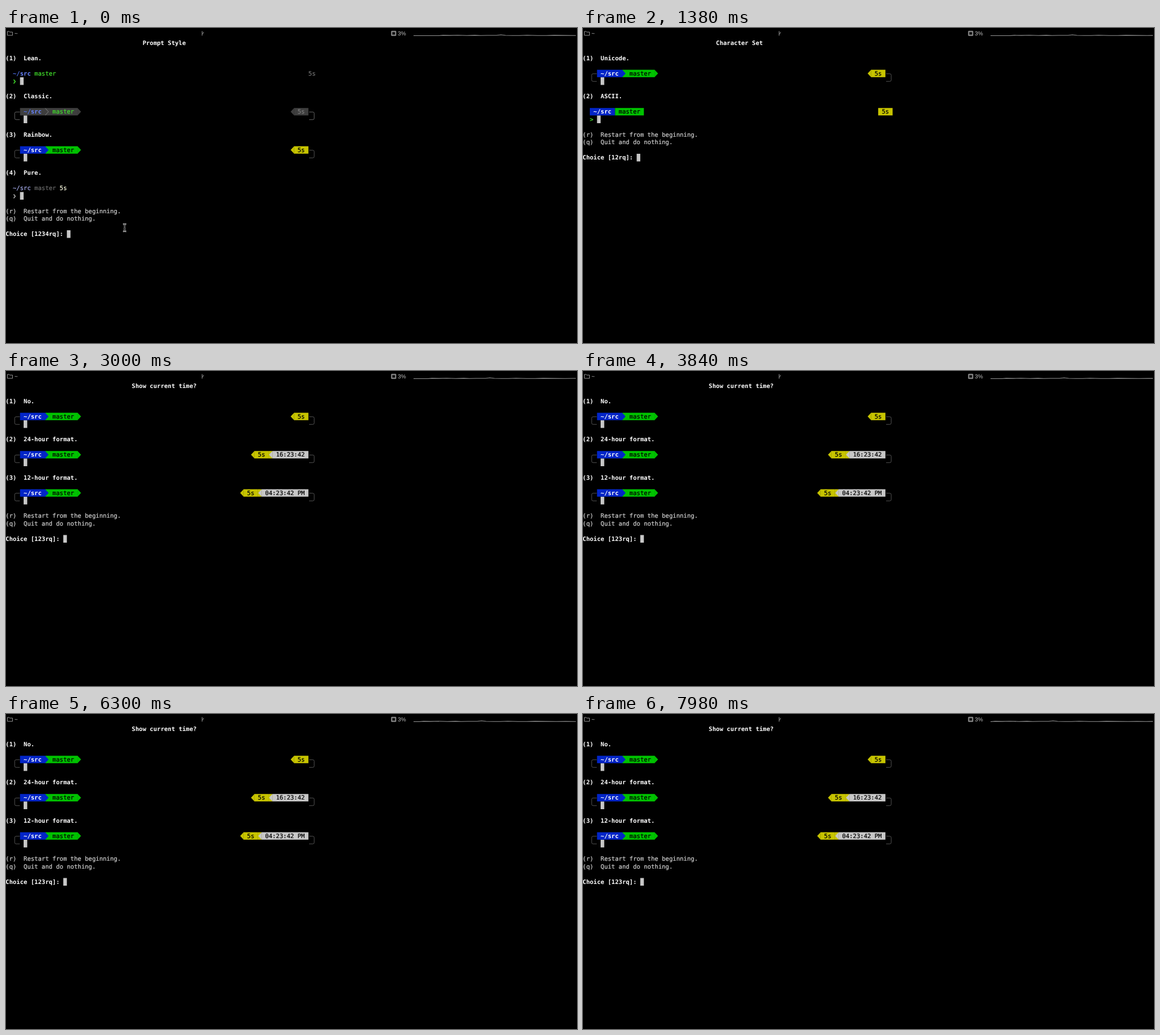
An HTML page for the animation above (8 s loop, 1006 px wide and 556 px high).

```html
<!DOCTYPE html>
<html lang="en">
<head>
<meta charset="utf-8">
<title>Prompt setup wizard</title>
<style>
  html, body { margin: 0; width: 100%; height: 100%; overflow: hidden; background: #000; }
  svg { display: block; }
  text {
    font-family: "DejaVu Sans Mono", monospace;
    font-size: 10.55px;
    text-rendering: geometricPrecision;
    white-space: pre;
  }
  .bold { font-weight: bold; }
  .plain { stroke-width: .22; }
  .status { font-family: "Liberation Sans", sans-serif; font-size: 10px; fill: #bcbcbc; }
  .line { fill: none; stroke: #959595; }
</style>
</head>
<body>
<svg id="stage" width="1006" height="556" viewBox="0 0 1006 556">
  <g id="bar">
    <path class="line" d="M2.5 6h3l1 1.2h5v5.8h-9z"/>
    <text class="status" x="15" y="12.8">~</text>
    <path class="line" d="M345.5 5.5v8M345.5 10.5q2.5 0 2.5-3.5"/>
    <rect class="line" x="679.5" y="6" width="7" height="7" stroke-width="1.6"/>
    <path class="line" d="M681 4.5v10M683 4.5v10M685 4.5v10M678 7.5h10M678 9.5h10M678 11.5h10" opacity=".35"/>
    <rect x="681.3" y="7.8" width="3.4" height="3.4" fill="#000"/>
    <text class="status" x="690.2" y="13">3%</text>
    <svg x="718" y="0" width="286" height="19"><path id="load" class="line" stroke-width="1.1"/></svg>
  </g>
</svg>
<script>
const LOOP = 8000;
const LEFT = -.7, TOP = 19.5, CELL = 6.351, ROW = 13.5, COLS = 88;
const BLUE = "#0225c7", GREEN = "#00c200", YELLOW = "#c7c400", SILVER = "#c7c7c7";
const LEAF = "#42e02c", SKY = "#6683ff", SLATE = "#3e3e3e";
const stage = document.getElementById("stage");
const load = document.getElementById("load");
let layer;

function add(tag, attrs, content) {
  const el = document.createElementNS("http://www.w3.org/2000/svg", tag);
  for (const key in attrs) el.setAttribute(key, attrs[key]);
  if (content) el.textContent = content;
  layer.append(el);
  return el;
}

const colX = col => LEFT + col * CELL;
const rowY = row => TOP + row * ROW;

function write(col, row, content, fill = "#fff", bold = true) {
  const look = bold ? { class: "bold" } : { class: "plain", stroke: fill };
  add("text", { x: colX(col), y: rowY(row) + 10.4, fill, ...look }, content);
}

function cursor(col, row) {
  add("rect", { x: colX(col), y: rowY(row), width: CELL, height: ROW, fill: SILVER });
}

function block(col, row, cells, fill) {
  add("rect", { x: colX(col), y: rowY(row) + .2, width: cells * CELL, height: 13.1, fill });
}

// Solid triangle filling one cell; dir is 1 for right, -1 for left.
function arrow(col, row, dir, fill) {
  const base = colX(dir > 0 ? col : col + 1) - dir * .2;
  const y = rowY(row) + .2;
  add("path", { d: `M${base} ${y}l${dir * 6.1} 6.55l${-dir * 6.1} 6.55z`, fill });
}

function chevron(col, row, stroke) {
  add("path", {
    d: `M${colX(col) + 1.5} ${rowY(row) + 4}l2.8 3.5l-2.8 3.5`,
    fill: "none", stroke, "stroke-width": 1.5
  });
}

function brackets(row, stroke) {
  const y = rowY(row) + 7.25;
  const side = (x, dir) =>
    `M${x} ${y}h${dir * 6.5}q${dir * 2.5} 0 ${dir * 2.5} 2.5v${ROW - 5}q0 2.5 ${-dir * 2.5} 2.5h${-dir * 6.5}`;
  add("path", { d: side(24.3, -1) + side(534, 1), fill: "none", stroke, "stroke-width": .9 });
}

// Coloured two-line prompt, optionally with a clock on its right side.
function rainbow(row, clock = "") {
  brackets(row, "#5c5c5c");
  block(4, row, 7, BLUE);
  block(11, row, 9, GREEN);
  arrow(11, row, 1, BLUE);
  arrow(20, row, 1, GREEN);
  write(5, row, "~/src");
  write(13, row, "master", "#000", false);

  let end = 84;
  if (clock) {
    const cells = clock.length + 2;
    end -= cells;
    block(end, row, cells, SILVER);
    write(end + 1, row, clock, "#000", false);
    end--;
    block(end, row, 1, YELLOW);
    arrow(end, row, -1, SILVER);
  }
  block(end - 4, row, 4, YELLOW);
  arrow(end - 5, row, -1, YELLOW);
  write(end - 3, row, "5s", "#000", false);
  cursor(5, row + 1);
}

function lean(row) {
  write(2, row, "~/", "#4f70e8");
  write(4, row, "src", SKY);
  write(8, row, "master", LEAF, false);
  write(84, row, "5s", "#707070", false);
  chevron(2, row + 1, LEAF);
  cursor(4, row + 1);
}

function classic(row) {
  brackets(row, "#707070");
  block(4, row, 16, SLATE);
  arrow(20, row, 1, SLATE);
  write(5, row, "~/", "#4f70e8");
  write(7, row, "src", SKY);
  const y = rowY(row) + .6;
  add("path", { d: `M${colX(11)} ${y}l5.6 6.15l-5.6 6.15`, fill: "none", stroke: "#858585", "stroke-width": .9 });
  write(13, row, "master", LEAF, false);
  block(80, row, 4, SLATE);
  arrow(79, row, -1, SLATE);
  write(81, row, "5s", "#7c7c7c", false);
  cursor(5, row + 1);
}

function pure(row) {
  write(2, row, "~/src", "#a6acec", false);
  write(8, row, "master", "#6a6a6a", false);
  write(15, row, "5s", "#fafae0", false);
  chevron(2, row + 1, "#b4b4b4");
  cursor(4, row + 1);
}

function ascii(row) {
  block(2, row, 7, BLUE);
  block(9, row, 8, GREEN);
  block(82, row, 4, YELLOW);
  write(3, row, "~/src");
  write(10, row, "master", "#000", false);
  write(83, row, "5s", "#000", false);
  write(2, row + 1, ">", LEAF);
  cursor(4, row + 1);
}

function pointer(x, y) {
  const d = `M${x - 3} ${y - 6.5}q3 0 3 2v9q0 2 -3 2M${x + 3} ${y - 6.5}q-3 0 -3 2v9q0 2 3 2M${x - 1.5} ${y + 2}h3`;
  add("path", { d, fill: "none", stroke: "#ddd", "stroke-width": 2.4 });
  add("path", { d, fill: "none", stroke: "#000", "stroke-width": .8 });
}

function screen(title, options) {
  const group = layer = stage.appendChild(document.createElementNS(stage.namespaceURI, "g"));
  write(Math.floor((COLS - title.length) / 2), 0, title);
  options.forEach(([label, draw], i) => {
    const row = 2 + i * 5;
    write(0, row, `(${i + 1})  ${label}.`);
    draw(row + 2);
  });
  const row = 2 + options.length * 5;
  write(0, row, "(r)  Restart from the beginning.", "#cfcfcf", false);
  write(0, row + 1, "(q)  Quit and do nothing.", "#cfcfcf", false);
  const keys = "1234".slice(0, options.length);
  const ask = `Choice [${keys}rq]: `;
  write(0, row + 3, ask);
  cursor(ask.length, row + 3);
  return group;
}

const screens = [
  { start: 0, group: screen("Prompt Style", [["Lean", lean], ["Classic", classic], ["Rainbow", r => rainbow(r)], ["Pure", pure]]) },
  { start: 420, group: screen("Character Set", [["Unicode", r => rainbow(r)], ["ASCII", ascii]]) },
  { start: 3000, group: screen("Show current time?", [
    ["No", r => rainbow(r)],
    ["24-hour format", r => rainbow(r, "16:23:42")],
    ["12-hour format", r => rainbow(r, "04:23:42 PM")]
  ]) }
];
layer = screens[0].group;
pointer(209, 352.5);

// Load history: distance along the graph and height above its base.
const history = [
  [0, 0], [44, 0], [52, .6], [64, .4], [78, .7], [94, .3], [108, .6], [118, .2], [130, .5], [146, .5],
  [154, 1.5], [162, .5], [175, .3], [187, .2], [200, .7], [218, .3], [234, .2], [248, .6], [266, .4],
  [286, .3], [302, .5], [318, .3], [340, .4]
];
load.setAttribute("d", "M" + history.map(([x, h]) => `${x} ${13.5 - h}`).join("L"));

function draw(t) {
  const ticks = t < 150 ? 0 : Math.floor((t - 150) / 900) + 1;
  load.setAttribute("transform", `translate(${-ticks * 4.88} 0)`);
  const shown = screens.filter(s => t >= s.start).length - 1;
  screens.forEach((s, i) => s.group.setAttribute("display", i === shown ? "inline" : "none"));
}

const begin = performance.now();
function tick() {
  draw((performance.now() - begin) % LOOP);
  requestAnimationFrame(tick);
}
tick();
</script>
</body>
</html>
```
